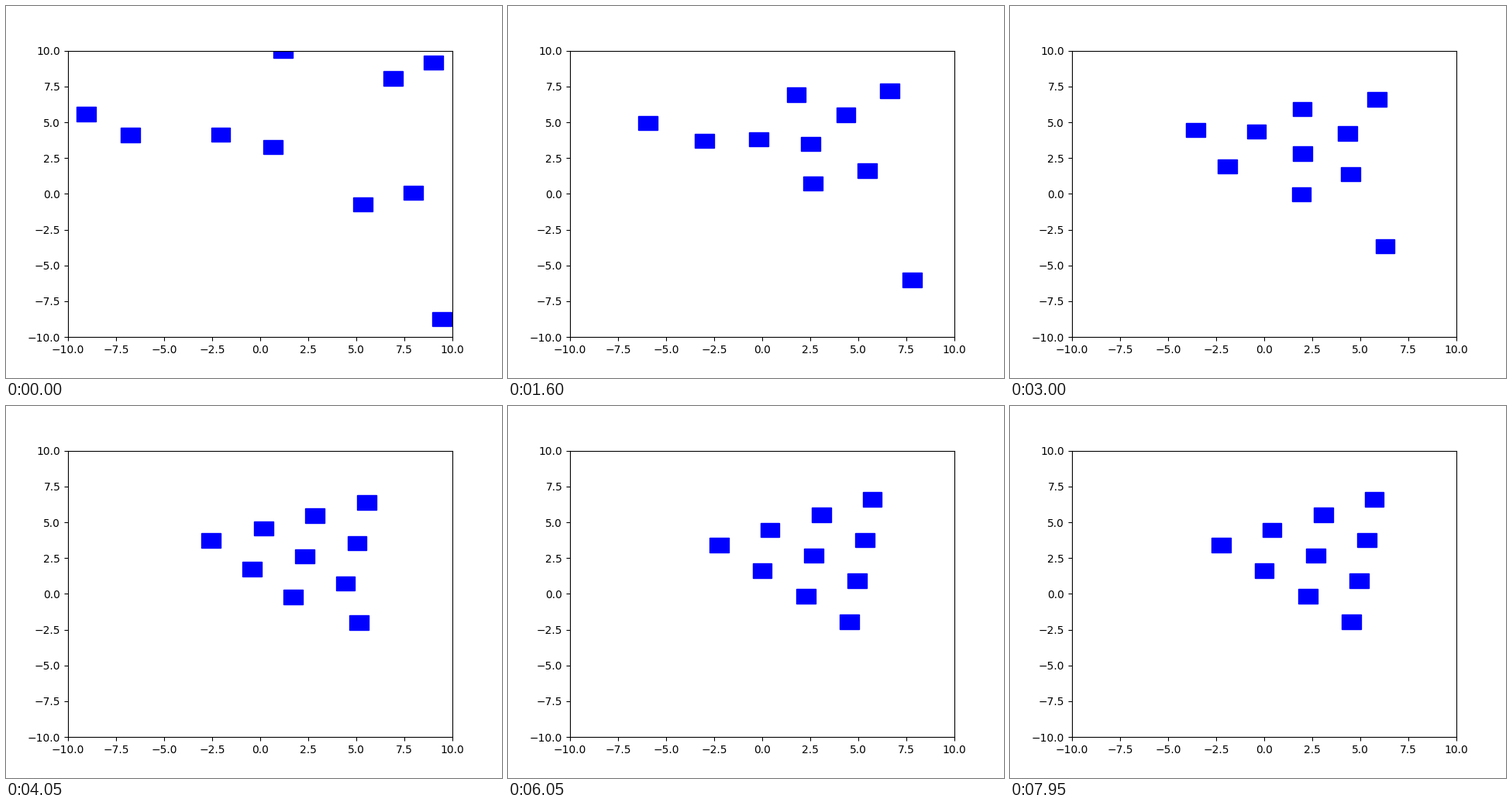
Write a matplotlib script that moves like this. It is 640 px wide and 480 px high and loops after 8000 ms.

```python
import numpy as np
import matplotlib.pyplot as plt
from matplotlib.animation import FuncAnimation
from matplotlib.patches import Rectangle

FRAMES, INTERVAL = 160, 50
MIDWAY, PACKED = 60, 99              # frames where the key poses are reached
SPEED, GAP, PUSH = 0.1, 3.02, 0.5

# Key poses in stage pixels, agents ordered by column of the final triangle
START = [(104, 140), (161, 167), (461, 256.5), (563, 404.5), (277.5, 166.5),
         (345, 182.5), (526, 241.5), (358, 58), (500, 94), (552, 73.5)]
MIDDLE = [(240, 160.5), (281, 207.5), (376.5, 243.5), (484.5, 310.5),
          (318.5, 162.5), (378, 191), (440, 217.5), (377.5, 133.5),
          (436, 165), (474, 121)]
TRIANGLE = [(272.8 + 56 * row + 66 * col, 180 + 33 * row - 19.6 * col)
            for col in range(4) for row in range(4 - col)]


def to_data(pixels):
    x, y = np.array(pixels, float).T
    return np.column_stack([(x - 80.5) / 24.8 - 10, 10 - (y - 58.1) / 18.48])


def step(pos):
    """Every agent heads for the centre of the group and keeps its distance."""
    pos = pos.copy()
    centre = pos.mean(axis=0)
    for i in range(len(pos)):
        pull = centre - pos[i]
        move = SPEED * pull / max(np.hypot(*pull), 0.5)
        away = pos[i] - pos
        dist = np.hypot(away[:, 0], away[:, 1])
        near = (dist > 0) & (dist < GAP)
        force = PUSH * (GAP - dist[near]) / dist[near]
        pos[i] += move + (force[:, None] * away[near]).sum(axis=0)
    return pos


def travel(start, end, count):
    """Simulate from start, bending the paths so that they reach end."""
    run = [start]
    for _ in range(count):
        run.append(step(run[-1]))
    run = np.array(run)
    share = np.linspace(0, 1, count + 1)[:, None, None]
    return (run + share * (end - run[-1]))[:-1]


def tremble(pose, count):
    """Hold the packed pose with a slight shake."""
    angle = np.arange(len(pose)) * 2.4
    shake = 0.012 * np.column_stack([np.cos(angle), np.sin(angle)])
    sign = (-1.0) ** np.arange(count)[:, None, None]
    return pose + sign * shake


start, middle, packed = map(to_data, (START, MIDDLE, TRIANGLE))
paths = np.concatenate([
    travel(start, middle, MIDWAY),
    travel(middle, packed, PACKED - MIDWAY),
    tremble(packed, FRAMES - PACKED),
])

fig, ax = plt.subplots(figsize=(6.4, 4.8), dpi=100)
ax.set_xlim(-10, 10)
ax.set_ylim(-10, 10)
agents = [ax.add_patch(Rectangle((0, 0), 1, 1, color="blue")) for _ in start]


def draw(frame):
    for agent, (x, y) in zip(agents, paths[frame]):
        agent.set_xy((x - 0.5, y - 0.5))
    return agents


anim = FuncAnimation(fig, draw, frames=FRAMES, interval=INTERVAL,
                     init_func=lambda: draw(0), repeat=True, repeat_delay=0)
plt.show()
```
